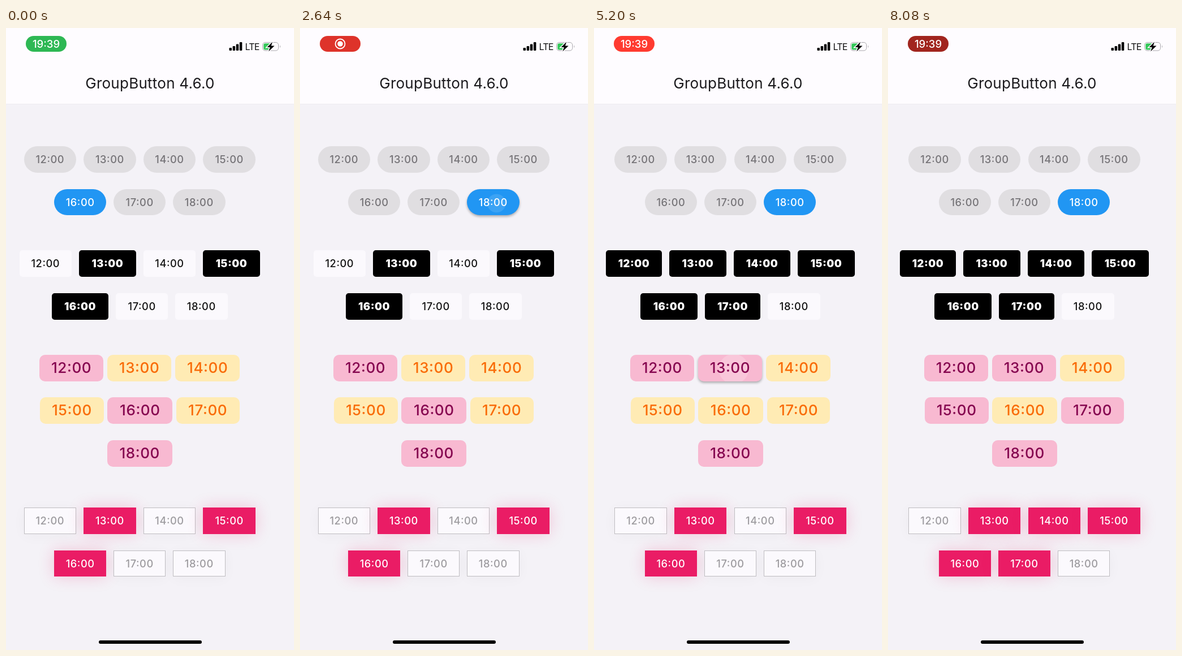
An HTML page for the animation above (8.12 s loop, 509x1100 px).

```html
<!DOCTYPE html>
<html lang="en">
<head>
<meta charset="utf-8">
<title>GroupButton</title>
<style>
html, body { margin: 0; width: 100%; height: 100%; overflow: hidden; }
body { position: relative; background: #f4f2f7; font-family: Inter, sans-serif; }
div, svg { position: absolute; }
header { position: absolute; width: 100%; height: 134px; background: #fefcff; box-shadow: 0 0 2px rgba(0,0,0,.08); }
h1 { position: absolute; top: 82px; width: 100%; margin: 0; text-align: center; color: #1c1b1e;
  font: 400 26.1px/32px Inter, sans-serif; letter-spacing: .2px; font-feature-settings: "calt" 1; }
#clock { left: 35px; top: 14px; width: 72px; height: 28px; border-radius: 14px; color: #fff;
  font: 500 18.5px/28px Inter, sans-serif; text-align: center; }
#home { left: 164px; top: 1083px; width: 182px; height: 6px; border-radius: 3px; background: #000; }
.button { height: 46.8px; box-sizing: border-box; text-align: center; white-space: nowrap;
  font-size: 18.27px; font-weight: 500; line-height: 46.8px; letter-spacing: .54px; font-feature-settings: "calt" 1;
  box-shadow: var(--glow, 0 0 #0000), 0 2.5px 4px rgba(0,0,0,var(--press, 0)); }
.button span { position: relative; }
.ink { inset: 0; border-radius: inherit; }
.pill { border-radius: 24px; background: #e0dee1; color: #757377; }
.pill.on { background: #2196f3; color: #fff; }
.card { border-radius: 5px; background: #fbf9fd; color: #111; }
.card.on { background: #000; color: #fff; font-weight: 900; }
.candy { border-radius: 10px; background: #ffebb4; color: #f96c08; font-size: 26.1px; }
.candy.on { background: #f8b9d1; color: #860650; }
.box { background: #fbf9fd; color: #9d9b9f; --glow: 0 3px 24px rgba(0,0,0,.035); }
.box::after { content: ""; position: absolute; inset: 0; border: 1px solid #bfbdc1; }
.box.on { background: #ea1c65; color: #fff; --glow: 0 0 28px rgba(234,28,101,.22); }
.box.on::after { border-color: #ea1c65; }
</style>
</head>
<body>
<header>
  <h1>GroupButton 4.6.0</h1>
  <div id="clock"><span id="time">19:39</span>
    <svg id="record" style="left:0;top:0" width="72" height="28">
      <circle cx="36" cy="14" r="8.5" fill="none" stroke="#fff" stroke-width="1.8"/>
      <circle cx="36" cy="14" r="4.8" fill="#fff"/>
    </svg>
  </div>
  <svg style="left:390px;top:18px" width="100" height="28">
    <g id="bars"></g>
    <text x="32.5" y="20.5" font-size="16" letter-spacing="-.8" fill="#111">LTE</text>
    <rect x="63.5" y="7.5" width="28" height="14.5" rx="4.5" fill="none" stroke="#aaa8ad"/>
    <path d="M94 12.5q2 2.3 0 4.6z" fill="#aaa8ad"/>
    <rect x="65.2" y="9.2" width="14" height="11.2" rx="2.6" fill="#34c759"/>
    <path d="M81 6.5 71.5 16h5.2l-2.6 7.5L84.5 13.400h-5.800z" stroke="#fefcff" stroke-width="3" paint-order="stroke" fill="#000"/>
  </svg>
</header>
<div id="home"></div>
<script>
const LOOP = 8120;
const $ = id => document.getElementById(id);
const clamp = x => Math.max(0, Math.min(1, x));
const HOURS = [[12, 13, 14, 15], [16, 17, 18]];

const normalWidth = h => h === 17 ? 91.6 : 92.6;
const boldWidth = h => h === 12 ? 99 : h === 17 ? 98 : 100.6;
const largeWidth = h => [113.3, 113.7, 114.5, 113, 115, 111.7, 115][h - 12];

const groups = [
  { look: 'pill', top: 209, gap: 13, rows: HOURS, start: [16], radio: true, width: normalWidth },
  { look: 'card', top: 393.4, gap: 13, rows: HOURS, start: [13, 15, 16],
    width: (h, on) => on ? boldWidth(h) : normalWidth(h) },
  { look: 'candy', top: 577.8, gap: 6.5, rows: [[12, 13, 14], [15, 16, 17], [18]], start: [12, 16, 18], width: largeWidth },
  { look: 'box', top: 848, gap: 13, rows: HOURS, start: [13, 15, 16], width: normalWidth }
];

// time, group, hour
const taps = [
  [1360, 0, 13], [2580, 0, 18],
  [3150, 1, 17], [3600, 1, 14], [4320, 1, 12],
  [4700, 2, 16], [5100, 2, 13], [5600, 2, 17], [6010, 2, 15],
  [6850, 3, 14], [7350, 3, 17]
];

// time, brightness of the recording badge
const pulse = [[0, 1], [700, .65], [1680, 1], [2200, .65], [2640, .87], [3300, .65], [4000, .92],
  [4600, .65], [5200, 1], [5760, .65], [6360, .85], [7200, 1], [8080, .63], [LOOP, .63]];

for (const group of groups) {
  group.buttons = {};
  for (const hour of group.rows.flat()) {
    const el = document.createElement('div');
    el.innerHTML = `<div class="ink"></div><span>${hour}:00</span>`;
    document.body.append(el);
    group.buttons[hour] = el;
  }
}
$('bars').innerHTML = [5, 8, 11.5, 15].map((h, i) =>
  `<rect x="${4.5 + i * 6.1}" y="${22 - h}" width="4.5" height="${h}" rx="1.2"/>`).join('');

function brightness(t) {
  const i = pulse.findIndex(([end]) => end > t);
  const [t0, a] = pulse[i - 1], [t1, b] = pulse[i];
  return a + (b - a) * (1 - Math.cos(Math.PI * (t - t0) / (t1 - t0))) / 2;
}

function drawClock(t) {
  const b = brightness(t), toRed = clamp((t - 60) / 240);
  const mix = (green, red) => green + (red * b - green) * toRed;
  $('clock').style.background = `rgb(${mix(46, 255)},${mix(184, 59)},${mix(84, 48)})`;
  const icon = t > 300 && t < 3300;
  $('time').style.opacity = icon ? 0 : 1;
  $('record').style.opacity = icon ? 1 : 0;
}

function drawButton(el, look, on, x, y, w, age) {
  el.className = `button ${look}${on ? ' on' : ''}`;
  el.style.left = x + 'px';
  el.style.top = y + 'px';
  el.style.width = w + 'px';
  el.style.setProperty('--press', .3 * clamp((300 - age) / 180));
  const alpha = .24 * clamp(age / 120) * clamp((500 - age) / 200);
  const radius = 10 + 10 * (age / 80) ** 2;
  el.firstChild.style.background = alpha > 0
    ? `radial-gradient(circle at ${w / 2 + 6}px 25px, rgba(255,255,255,${alpha}) ${radius}px, transparent ${radius + 1}px)`
    : 'none';
}

function draw(t) {
  drawClock(t);
  const selected = groups.map(g => new Set(g.start));
  const ages = groups.map(() => ({}));
  for (const [time, g, hour] of taps) {
    if (t < time) break;
    const set = selected[g];
    if (groups[g].radio) set.clear();
    if (!set.delete(hour)) set.add(hour);
    ages[g][hour] = t - time;
  }
  // the widening bold row moves the whole column
  const center = selected[1].has(12) ? 241 : selected[1].has(14) ? 237.4 : 236.2;
  groups.forEach(({ look, top, gap, rows, width, buttons }, g) => {
    rows.forEach((row, r) => {
      const widths = row.map(h => width(h, selected[g].has(h)));
      let x = center - (widths.reduce((a, b) => a + b) + gap * (row.length - 1)) / 2;
      row.forEach((h, i) => {
        drawButton(buttons[h], look, selected[g].has(h), x, top + r * 75.6, widths[i], ages[g][h] ?? 1e4);
        x += widths[i] + gap;
      });
    });
  });
}

const begin = performance.now();
function tick() {
  draw((performance.now() - begin) % LOOP);
  requestAnimationFrame(tick);
}
tick();
</script>
</body>
</html>
```
